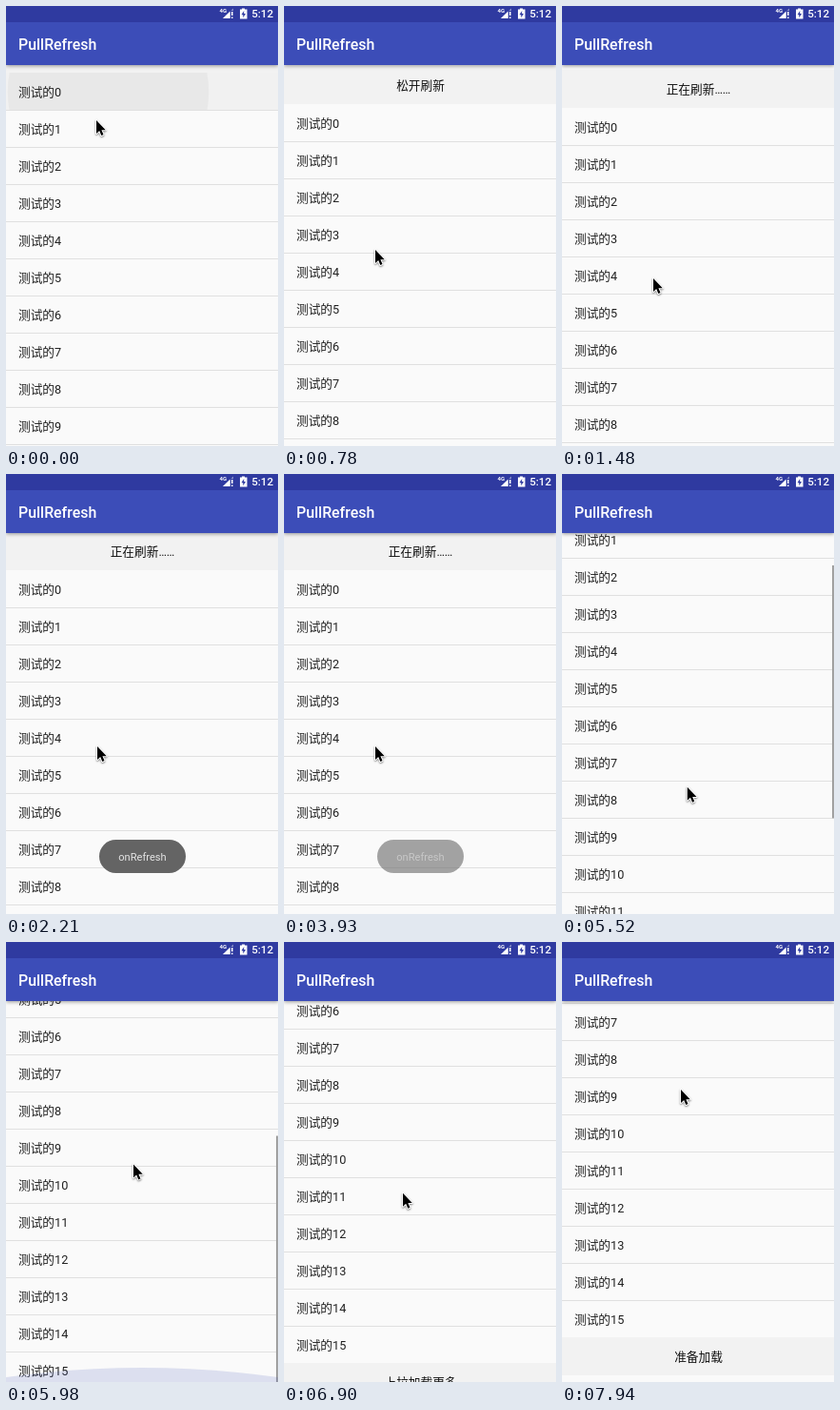
An HTML page with a canvas for the animation above (8000 ms loop, 286 by 462 pixels).

```html
<!DOCTYPE html>
<html lang="zh">
<head>
<meta charset="utf-8">
<style>
  html, body { margin: 0; width: 100%; height: 100%; overflow: hidden; background: #fafafa; }
  canvas { display: block; }
</style>
</head>
<body>
<canvas id="stage" width="286" height="462"></canvas>
<script>
const ctx = document.getElementById('stage').getContext('2d');
const LOOP = 8000, W = 286, H = 462;
const BAR = 62, BOTTOM = 469, ROW = 39, ROWS = 16, PANEL = 40;
const FONT = 'Roboto, "Noto Sans CJK SC", "Noto Sans CJK", sans-serif';

// Linear track through [time, value] points.
const track = (...points) => t => {
  if (t <= points[0][0]) return points[0][1];
  for (let i = 1; i < points.length; i++) {
    const [t0, v0] = points[i - 1], [t1, v1] = points[i];
    if (t < t1) return v0 + (v1 - v0) * (t - t0) / (t1 - t0);
  }
  return points[points.length - 1][1];
};

const listTop = track([30, 70], [780, 103], [840, 104], [1160, 110], [1430, 110], [1520, 105],
  [1620, 102], [1700, 101], [4640, 101], [4820, 74], [4880, 67], [4940, 62], [5380, 62],
  [5780, -85], [5860, -130], [5920, -155], [6340, -155], [6900, -182], [7590, -213],
  [7850, -213], [7940, -209]);
const cursorX = track([30, 95], [780, 96], [5100, 96], [5360, 131], [5980, 134], [6300, 125]);
const cursorY = track([30, 120], [780, 256], [840, 259], [1160, 286], [5100, 286], [5360, 380],
  [5800, 240], [5920, 233], [5980, 233], [6300, 372], [6340, 372], [6900, 264], [7590, 155]);
const toastAlpha = track([1830, 0], [2210, 1], [3770, 1], [4150, 0]);
const rippleAlpha = track([30, 1], [350, 0]);
const rippleRadius = track([0, 105], [250, 280]);
const glowAlpha = track([5850, 0], [5930, 0.16], [5980, 0.16], [6400, 0]);
const scrollbarAlpha = track([5380, 0], [5420, 1], [6250, 1], [6500, 0]);

function rect(x, y, w, h, color) {
  ctx.fillStyle = color;
  ctx.fillRect(x, y, w, h);
}

function text(str, x, y, size, color, align = 'left', weight = 400) {
  ctx.font = `${weight} ${size}px ${FONT}`;
  ctx.textAlign = align;
  ctx.fillStyle = color;
  ctx.fillText(str, x, y);
}

function polygon(points, color) {
  ctx.beginPath();
  points.forEach(([x, y]) => ctx.lineTo(x, y));
  ctx.closePath();
  ctx.fillStyle = color;
  ctx.fill();
}

function panel(y, label) {
  rect(0, y, W, PANEL, '#f2f2f2');
  text(label, W / 2 + 0.5, y + 24.7, 12.7, '#111', 'center');
}

function ripple(t, top) {
  const alpha = rippleAlpha(t);
  if (!alpha) return;
  ctx.save();
  ctx.globalAlpha = alpha;
  ctx.beginPath();
  ctx.rect(0, top, W, ROW);
  ctx.clip();
  rect(0, top, W, ROW, '#f1f1f1');
  ctx.beginPath();
  ctx.arc(107.5, top + 20, rippleRadius(t), 0, 2 * Math.PI);
  ctx.fillStyle = '#e8e8e8';
  ctx.fill();
  ctx.restore();
}

function list(t) {
  const top = Math.round(listTop(t));
  const header = t >= 1430 && t < 4640 ? '正在刷新……'
    : top >= 102 ? '松开刷新' : '下拉刷新';
  panel(top - PANEL, header);
  ripple(t, top);
  for (let i = 0; i < ROWS; i++) {
    const y = top + i * ROW;
    text('测试的' + i, 13, y + 24.5, 12.7, '#212121');
    if (i < ROWS - 1) rect(0, y + ROW, W, 1, '#e0e0e0');
  }
  const end = top + ROWS * ROW;
  panel(end, end + PANEL < BOTTOM ? '准备加载' : '上拉加载更多');

  const view = BOTTOM - BAR, scale = view / (ROWS * ROW);
  ctx.globalAlpha = scrollbarAlpha(t);
  rect(W - 2, BAR + (BAR - top) * scale, 2, view * scale, '#a0a0a0');
  ctx.globalAlpha = glowAlpha(t);
  ctx.beginPath();
  ctx.arc(W / 2, 447 + 1027, 1027, 0, 2 * Math.PI);
  ctx.fillStyle = '#3f51b5';
  ctx.fill();
  ctx.globalAlpha = 1;
}

function toast(t) {
  ctx.globalAlpha = toastAlpha(t);
  ctx.beginPath();
  ctx.roundRect(98, 384, 91, 35, 17.5);
  ctx.fillStyle = '#646464';
  ctx.fill();
  text('onRefresh', 143.5, 406, 11.1, '#e4e4e4', 'center');
  ctx.globalAlpha = 1;
}

function bars() {
  ctx.save();
  ctx.shadowColor = 'rgba(0,0,0,.4)';
  ctx.shadowBlur = 4;
  ctx.shadowOffsetY = 1;
  rect(0, 0, W, BAR, '#3c4db8');
  ctx.restore();
  rect(0, 0, W, 17, '#2f3aa0');
  text('PullRefresh', 13, 46, 15.9, '#fff', 'left', 500);

  text('4G', 224.5, 7, 6, '#fff', 'left', 700);
  polygon([[228, 13], [239, 2.5], [239, 13]], '#8f96cc');
  polygon([[228, 13], [235.5, 5.8], [235.5, 13]], '#fff');
  rect(236, 5, 3, 8, '#2f3aa0');
  rect(237, 6, 1.5, 4, '#fff');
  rect(237, 11.5, 1.5, 1.5, '#fff');

  rect(248, 2.5, 3, 2, '#fff');
  rect(246, 3.5, 7.5, 10, '#fff');
  polygon([[250.2, 5], [247.5, 9.2], [249.3, 9.2], [249.3, 12.3], [252, 8], [250.2, 8]], '#2f3aa0');
  text('5:12', 281, 12.2, 11.6, '#fff', 'right', 500);
}

function cursor(t) {
  ctx.save();
  ctx.translate(cursorX(t), cursorY(t));
  ctx.shadowColor = 'rgba(0,0,0,.4)';
  ctx.shadowBlur = 2;
  ctx.shadowOffsetY = 1;
  polygon([[0, 0], [0, 14], [3.2, 11], [5.3, 16], [7.5, 15], [5.4, 10.2], [9.8, 10.2]], '#000');
  ctx.lineWidth = 2;
  ctx.lineJoin = 'round';
  ctx.strokeStyle = '#fff';
  ctx.stroke();
  ctx.shadowColor = 'transparent';
  ctx.fill();
  ctx.restore();
}

function draw(now) {
  const t = now % LOOP;
  rect(0, 0, W, H, '#fafafa');
  list(t);
  toast(t);
  bars();
  cursor(t);
  requestAnimationFrame(draw);
}
requestAnimationFrame(draw);
</script>
</body>
</html>
```
